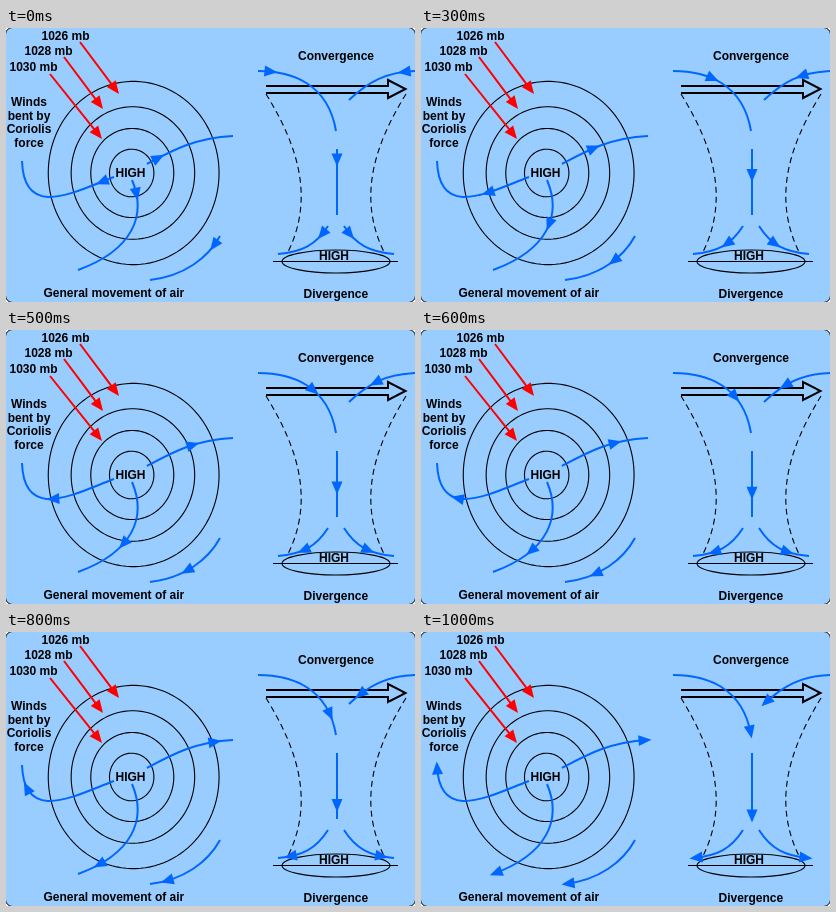
These frames come from a looping animation (409x274 px, 1100 ms). An HTML page:

```html
<!DOCTYPE html>
<html lang="en">
<head>
<meta charset="utf-8">
<title>High pressure air flow</title>
<style>
html, body { margin: 0; width: 100%; height: 100%; overflow: hidden; background: #fff; }
svg { display: block; }
text { font: bold 12px Arial, "Liberation Sans", sans-serif; }
path { fill: none; }
.line { fill: none; stroke: #000; stroke-width: 1.1; }
.thick { stroke: #000; stroke-width: 2; }
.dash { stroke: #000; stroke-width: 1.1; stroke-dasharray: 6 4; }
.wind { stroke: #06f; stroke-width: 2; }
.red { stroke: #f00; stroke-width: 2; }
</style>
</head>
<body>
<svg id="stage" width="409" height="274" viewBox="0 0 409 274">
  <rect x="-.5" y="-.5" width="410" height="275" rx="7" fill="#9cf" stroke="#000"/>
  <ellipse class="line" cx="330" cy="233.5" rx="54" ry="11.5"/>
  <path class="line" d="M267 233.5H392"/>
  <path class="thick" d="M260 58H382V52L399.5 61L382 70V65H260"/>
  <text x="35.5" y="12">1026 mb</text>
  <text x="18.5" y="27">1028 mb</text>
  <text x="3.5" y="43">1030 mb</text>
  <g text-anchor="middle">
    <text x="23" y="78">Winds</text>
    <text x="23" y="92">bent by</text>
    <text x="23" y="105">Coriolis</text>
    <text x="23" y="119">force</text>
  </g>
  <text x="109.5" y="149">HIGH</text>
  <text x="313" y="232">HIGH</text>
  <text x="37.5" y="269">General movement of air</text>
  <text x="292" y="32">Convergence</text>
  <text x="297.5" y="270">Divergence</text>
</svg>
<script>
const stage = document.getElementById("stage");

function addPath(type, d) {
  const el = document.createElementNS("http://www.w3.org/2000/svg", "path");
  el.setAttribute("class", type);
  el.setAttribute("d", d);
  return stage.appendChild(el);
}

function addHead(color) {
  const el = addPath("", "M-6.5-5.5L6.5 0L-6.5 5.5Z");
  el.style.fill = color;
  return el;
}

function place(el, x, y, angle) {
  el.setAttribute("transform", `translate(${x} ${y}) rotate(${angle * 180 / Math.PI})`);
}

// Flip a path of "x,y" pairs about the axis of the air column.
const mirror = d => d.replace(/[\d.]+(?=,)/g, x => 660 - x);

// Isobar: a circle, slightly tall and pushed to the right.
function isobar(radius) {
  const points = [];
  for (let a = 0; a < 2 * Math.PI; a += Math.PI / 60) {
    const r = radius * (1 + 0.03 * Math.cos(a) - 0.035 * Math.cos(2 * a));
    points.push([125 + r * Math.cos(a), 145 + r * Math.sin(a)]);
  }
  addPath("line", "M" + points.join("L") + "Z");
}
[23, 43, 64, 88.5].forEach(isobar);

const side = "M260,66C287,110 311,165 282,224";
addPath("dash", side);
addPath("dash", mirror(side));

// Pressure pointer from (x, y) to a tip offset by (dx, dy)
function pointer(x, y, dx, dy) {
  const angle = Math.atan2(dy, dx);
  const endX = x + dx - 6.5 * Math.cos(angle), endY = y + dy - 6.5 * Math.sin(angle);
  addPath("red", `M${x} ${y}L${endX} ${endY}`);
  place(addHead("#f00"), endX, endY, angle);
}
pointer(74, 14, 39, 52);
pointer(58, 29, 39, 52);
pointer(44, 46, 52, 65);

// Wind whose arrowhead sets off at distance start along the path
function wind(d, start) {
  const path = addPath("wind", d);
  return { path, start, end: path.getTotalLength() - 3, head: addHead("#06f") };
}
const outflow = "M322,198C310,217 296,224 272,226";
const winds = [
  wind("M108,149C70,163 18,193 16,133", 13),
  wind("M141,136C165,123 188,110 227,108", 13),
  wind("M126,152C141,187 127,222 72,242", 15),
  wind("M214,208C202,230 178,248 144,252", 11),
  wind("M252,43C285,43 322,55 330,103", 13),
  wind("M409,43C380,44 362,54 343,72", 11),
  wind("M331,121V187", 11),
  wind(outflow, 10),
  wind(mirror(outflow), 10)
];

function draw(time) {
  const part = Math.floor(time % 1100 / 100) / 10;
  for (const { path, start, end, head } of winds) {
    const s = start + (end - start) * part;
    const p = path.getPointAtLength(s);
    const a = path.getPointAtLength(s - 3), b = path.getPointAtLength(s + 3);
    place(head, p.x, p.y, Math.atan2(b.y - a.y, b.x - a.x));
  }
}

const begin = performance.now();
function tick() {
  draw(performance.now() - begin);
  requestAnimationFrame(tick);
}
tick();
</script>
</body>
</html>
```
